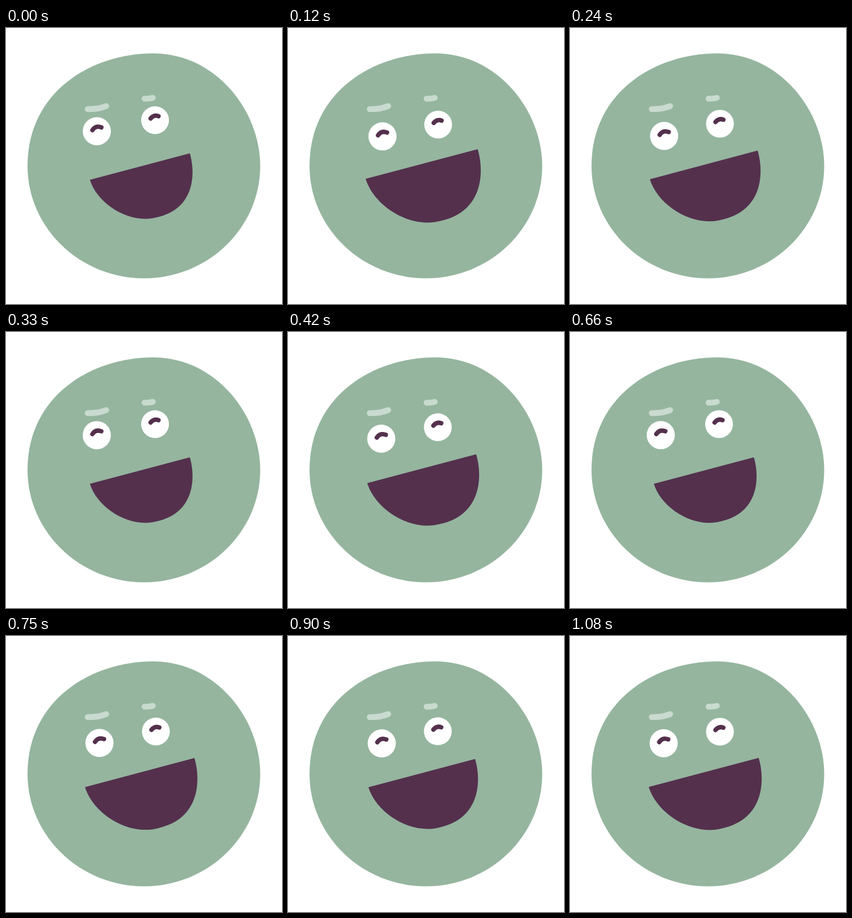
An HTML page with a canvas for the animation above (1110 ms loop, 500 by 500 pixels).

```html
<!DOCTYPE html>
<html lang="en">
<head>
<meta charset="utf-8">
<title>Laughing face</title>
<style>
html, body { margin: 0; width: 100%; height: 100%; overflow: hidden; background: #fff; }
canvas { display: block; width: 500px; height: 500px; }
</style>
</head>
<body>
<canvas id="stage" width="500" height="500"></canvas>
<script>
const ctx = document.getElementById('stage').getContext('2d');
const LOOP = 1110, STEP = 30, PERIOD = 326;
const GREEN = '#95b59f', PLUM = '#54304d', BROW = '#c9dacf';

const face = new Path2D('M267 46C380 46 460.5 150 460.5 250C460.5 362 366 453.5 250 453.5C134 453.5 39 362 39 250C39 115 155 46 267 46Z');
const mouth = new Path2D('M152 275L333 227C344 264 342 328 273 343C225 356 166 320 152 275Z');
const brows = [
  new Path2D('M148 147Q166 147.5 181.5 141.5'),
  new Path2D('M251 128Q259 128.5 266 126.5')
];
const eyes = [
  { x: 164.4, y: 186.8, r: 25.5, dx: 9.2, dy: 13, lag: 0.04, lid: new Path2D('M-8 -2Q-2 -11 8.2 -7') },
  { x: 270, y: 166.9, r: 25.2, dx: 2.6, dy: 10.4, lag: 0.025, lid: new Path2D('M-8 -3Q-2 -10.5 6.2 -7.2') }
];

// 0 at rest, 1 at the height of each laugh
const swing = (t, lag = 0) => (1 - Math.cos(2 * Math.PI * (t / PERIOD - lag))) / 2;

function fill(path, color) {
  ctx.fillStyle = color;
  ctx.fill(path);
}

function stroke(path, color, width) {
  ctx.strokeStyle = color;
  ctx.lineWidth = width;
  ctx.stroke(path);
}

function drawEye(eye, t) {
  const u = swing(t, eye.lag);
  ctx.save();
  ctx.translate(eye.x + eye.dx * u, eye.y + eye.dy * u);
  ctx.fillStyle = '#fff';
  ctx.beginPath();
  ctx.arc(0, 0, eye.r, 0, 2 * Math.PI);
  ctx.fill();
  stroke(eye.lid, PLUM, 8);
  ctx.restore();
}

function drawMouth(t) {
  const s = 1 + 0.145 * swing(t);
  ctx.save();
  ctx.translate(245.3, 289);
  ctx.scale(s, s);
  ctx.translate(-245.3, -289);
  fill(mouth, PLUM);
  ctx.restore();
}

function draw(t) {
  ctx.fillStyle = '#fff';
  ctx.fillRect(0, 0, 500, 500);
  ctx.lineCap = ctx.lineJoin = 'round';
  fill(face, GREEN);
  brows.forEach(b => stroke(b, BROW, 10.5));
  eyes.forEach(e => drawEye(e, t));
  drawMouth(t);
}

const start = performance.now();
function tick() {
  const t = (performance.now() - start) % LOOP;
  draw(Math.floor(t / STEP) * STEP);
  requestAnimationFrame(tick);
}
tick();
</script>
</body>
</html>
```
